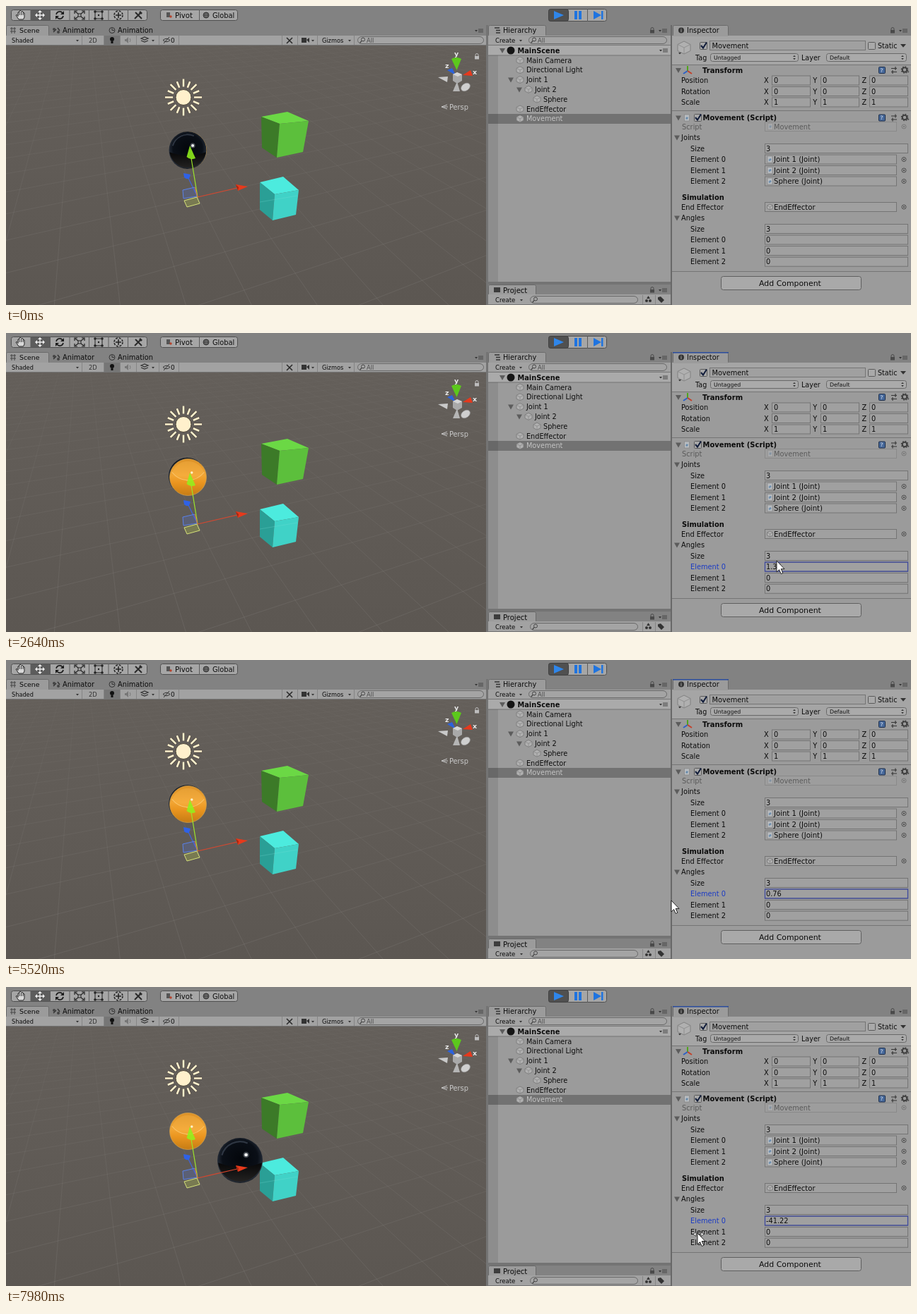
These frames come from a looping animation (1280x424 px, 8 s). An HTML page:

```html
<!DOCTYPE html>
<html lang="en">
<head>
<meta charset="utf-8">
<title>Joint angle editor</title>
<style>
html, body { margin: 0; width: 100%; height: 100%; overflow: hidden; background: #828282; }
svg { display: block; width: 100vw; height: 100vh; }
text { font-family: "DejaVu Sans", Verdana, sans-serif; white-space: pre; }
</style>
</head>
<body>
<svg id="stage" viewBox="0 0 1280 424" xmlns="http://www.w3.org/2000/svg"></svg>
<script>
const INK = '#0c0c0c', PANEL = '#9b9b9b', STRIP = '#828282', EDGE = '#686868';
const stage = document.getElementById('stage');

// Drawing helpers, all return markup
const box = (x, y, w, h, fill, more = '') => `<rect x="${x}" y="${y}" width="${w}" height="${h}" fill="${fill}" ${more}/>`;
const poly = (pts, fill, more = '') => `<polygon points="${pts}" fill="${fill}" ${more}/>`;
const path = (d, color, w = 1, more = '') => `<path d="${d}" fill="none" stroke="${color}" stroke-width="${w}" ${more}/>`;
const dot = (x, y, r, fill, more = '') => `<circle cx="${x}" cy="${y}" r="${r}" fill="${fill}" ${more}/>`;
const text = (x, y, s, size = 9.8, fill = INK, more = '') =>
  `<text x="${x}" y="${y + size * .37}" font-size="${size}" fill="${fill}" ${more}>${s}</text>`;
const bold = (x, y, s, size = 9.8) => text(x, y, s, size, INK, 'font-weight="700"');
const at = (x, y, s) => `<g transform="translate(${x} ${y})">${s}</g>`;
const frame = (x, y, w, h, fill, r = 0, stroke = EDGE) =>
  box(x + .5, y + .5, w - 1, h - 1, fill, `rx="${r}" stroke="${stroke}"`);
const down = (x, y, s = 3, c = '#333') => poly(`${x - s},${y - s / 2} ${x + s},${y - s / 2} ${x},${y + s * .7}`, c);
const fold = (x, y) => poly(`${x - 4},${y - 3} ${x + 4},${y - 3} ${x},${y + 4}`, '#5c5c5c');

const cubeIcon = (x, y, r = 5) => at(x, y,
  poly(`0,${-r} ${r},${-r * .5} ${r},${r * .5} 0,${r} ${-r},${r * .5} ${-r},${-r * .5}`, '#b0b0b0', 'stroke="#777" stroke-width=".8"') +
  path(`M${-r} ${-r * .5}L0 0L${r} ${-r * .5}M0 0V${r}`, '#888', .8));
const fileIcon = (x, y) => box(x - 3.5, y - 4.5, 7, 9, '#b8bcc0', 'stroke="#858585" stroke-width=".7"') +
  text(x - 2.2, y, '#', 5.5, '#3b6fa0');
const lock = (x, y, c = '#4a4a4a') => box(x - 3, y - 1, 6, 4.5, c) + path(`M${x - 2} ${y - 1}v-1.5a2 2 0 0 1 4 0v1.5`, c);
const menu = (x, y) => down(x - 4, y, 2) + path(`M${x - 1} ${y - 2}h7m-7 2h7m-7 2h7`, '#444', .9);
const lens = (x, y) => dot(x, y - 1, 2.5, 'none', 'stroke="#444"') + path(`M${x - 2} ${y + 1}l-2.5 3`, '#444', 1.2);
const pick = y => dot(1270, y, 3, 'none', 'stroke="#444" stroke-width=".9"') + dot(1270, y, 1, '#333');
const gear = (x, y) => dot(x, y, 3.2, 'none', 'stroke="#3c3c3c" stroke-width="1.8"') +
  dot(x, y, 4.6, 'none', 'stroke="#3c3c3c" stroke-width="1.4" stroke-dasharray="1.8 1.8"') + down(x + 5, y + 3, 1.6);
const field = (x, y, w) => frame(x, y - 7, w, 14, '#a0a0a0', 0, '#747474');
const check = (x, y, on) => frame(x - 5, y - 5, 11, 11, '#a9a9a9', 1, '#5a5a5a') +
  (on ? path(`M${x - 3} ${y}l3 3.5l5 -8`, '#101c3a', 2) : '');
const drop = (x, y, w, s) => frame(x, y - 6, w, 12, '#aaa', 3) + text(x + 5, y, s, 7.8) +
  down(x + w - 6, y + 2, 1.8) + poly(`${x + w - 8},${y - 1} ${x + w - 4},${y - 1} ${x + w - 6},${y - 3}`, '#333');
const search = (x, y, w, label) => frame(x, y - 5.5, w, 11, '#a4a4a4', 5.5) + lens(x + 8, y) + text(x + 13, y, label, 8.4, '#4c4c4c');
const line = (x, y, w) => box(x, y, w, 1, '#757575');

const defs = `<defs>
<clipPath id="view"><rect y="56" width="679" height="368"/></clipPath>
<linearGradient id="ground" x2="0" y2="1"><stop stop-color="#645f5a"/><stop offset="1" stop-color="#5c5752"/></linearGradient>
<linearGradient id="fade" gradientUnits="userSpaceOnUse" x1="0" y1="56" x2="0" y2="424">
<stop stop-color="#ddd" stop-opacity=".02"/><stop offset="1" stop-color="#ddd" stop-opacity=".09"/></linearGradient>
<radialGradient id="dark" cx=".5" cy=".45" r=".56"><stop stop-color="#04070c"/><stop offset=".7" stop-color="#0a0f17"/>
<stop offset=".92" stop-color="#262e3a"/><stop offset="1" stop-color="#12151a"/></radialGradient>
<linearGradient id="floor" x2="0" y2="1"><stop stop-color="#070708"/><stop offset="1" stop-color="#232221"/></linearGradient>
<linearGradient id="gold" x2="0" y2="1"><stop stop-color="#dc9228"/><stop offset=".45" stop-color="#f2a533"/>
<stop offset=".65" stop-color="#ea951f"/><stop offset="1" stop-color="#c67c14"/></linearGradient></defs>`;

// Perspective floor, in homogeneous coordinates
function floorGrid() {
  const a = .039, b = .095;
  const pt = (i, j) => {
    const w = 1 + a * i + b * j;
    return [(271 + 1736 * a * i + 106 * b * j) / w, (271 - 60 * (a * i + b * j)) / w].map(n => n.toFixed(1)).join(' ');
  };
  let d = '';
  for (let i = -32; i <= 60; i++) d += `M${pt(i, (-.88 - a * i) / b)}L${pt(i, 40)}`;
  for (let j = -14; j <= 28; j++) d += `M${pt((-.88 - b * j) / a, j)}L${pt(90, j)}`;
  return path(d, 'url(#fade)', 1);
}

function sun() {
  let d = '';
  for (let k = 0; k < 16; k++) {
    const q = k * Math.PI / 8, c = Math.cos(q), s = Math.sin(q), r = k % 2 ? 24 : 26;
    d += `M${15 * c} ${15 * s}L${r * c} ${r * s}`;
  }
  return at(251, 129.5, path(d, '#3a352c', 4.4, 'opacity=".4"') + path(d, '#fff0cc', 2.6) +
    dot(0, 0, 11, '#fff0cc', 'stroke="#4b4438" stroke-width="1"'));
}

const ball = (id, inner) => `<g id="${id}">${inner}</g>`;
const darkBall = dot(0, 0, 30, 'url(#dark)') +
  '<path d="M-29 3Q0 14 29 3A29.3 29.3 0 0 1 -29 3Z" fill="url(#floor)"/>' +
  path('M-24 -7A25 25 0 0 1 10 -23', '#46505f', 2, 'opacity=".6"') + dot(8, -7.5, 4, '#b9c2cc', 'opacity=".35"') + dot(8, -7.5, 2.2, '#fff');
const goldBall = dot(0, 0, 29.6, 'url(#gold)', 'stroke="#cfa050" stroke-width=".9"') +
  '<path d="M-26 -8Q-18 -25 0 -26Q18 -25 26 -8Q15 5 0 5Q-15 5 -26 -8Z" fill="#ffc45c" opacity=".22"/>' +
  path('M-26 -8Q-15 5 0 5Q15 5 26 -8', '#ffd488', 1.2, 'opacity=".7"') + dot(6, -7.5, 2, '#fff3c8');

const cubes =
  poly('361,157 398,150 428,163 387,167', '#6bd845') + poly('361,157 387,167 383,215 362,201', '#3c7a28') +
  poly('387,167 428,163 420,207 383,215', '#5cbf3c') +
  poly('359,250 392,242 414,261 380,267', '#4cebde') + poly('359,250 380,267 377,304 359,289', '#2a9f96') +
  poly('380,267 414,261 410,296 377,304', '#40d2c7') + path('M359 278L412 269', '#7adfd6', .7, 'opacity=".4"');

const handles =
  path('M271 271L327 258', '#d8452c', 1.2) + path('M271 271L262 216', '#9be42c', 1.2) + path('M268 265L258 244', '#3c62e0', 1.2) +
  poly('250,261 267,257 270,270 251,273', '#4a70d8', 'fill-opacity=".25" stroke="#5a82ea"') +
  poly('252,276 270,271 274,280 256,285', '#a9b84a', 'fill-opacity=".35" stroke="#d6e27a"') +
  path('M267 257L271 271', '#e06a3c', 1) +
  poly('325,253 342,256 328,262', '#e63a1c') + poly('325,253 329,257 328,262', '#a8260f') +
  `<path d="M260 198L255.500 214Q261 219 268 216Z" fill="#92f01c" opacity=".88"/>` +
  `<path d="M251 237L261 239L259 245Q255 246 252 243Z" fill="#2f62e6"/>`;

const compass =
  poly('611,101 625,100 624,108', '#c9c9c9') + poly('632,121 642,121 638,107', '#b5b5b5') +
  '<ellipse cx="650" cy="115" rx="7" ry="5" transform="rotate(-35 650 115)" fill="#cfcfcf" stroke="#999" stroke-width=".6"/>' +
  poly('624,91 631,88 636,98', '#2c62dc') +
  poly('632,97 638,94 645,97 645,106 638,110 632,106', '#a9a9a9') + poly('632,97 638,94 645,97 639,100', '#d4d4d4') +
  poly('646,98 657,91 660,99', '#e5391d') + '<path d="M630 75Q637 71 644 75L637.500 91Z" fill="#5cc81c"/>' +
  [['y', 634, 67], ['z', 621, 84], ['x', 660, 93]].map(([s, x, y]) => text(x, y, s, 9.5, '#e8e8e8', 'font-weight="700"')).join('') +
  lock(666, 72, '#bdbdbd') + path('M624 140L616 143L624 146M616 143H625', '#c6c6c6', 1) + text(627, 143, 'Persp', 9.8, '#c8c8c8');

function topBar() {
  let s = frame(7, 5, 193, 16, '#a6a6a6', 3, '#4f4f4f') + box(35, 5.5, 27, 15, '#5c5c5c');
  for (let k = 1; k < 7; k++) s += box(7 + k * 27.5, 5, 1, 16, '#5c5c5c');
  s += at(21, 13, '<path d="M-3 6L-7 0L-5.500 -.5L-4 1.500V-4L-2 -4.500V-6L0 -6.500L1 -5.500L3 -5V-3.500L5 -3V3L3.500 6Z" fill="#d8d8d8" stroke="#222"/>' +
    path('M-2 -4V0M.5 -5V0M3 -3V0', '#222', .9));
  s += at(48, 13, path('M-5 0H5M0 -5V5', '#eee', 1.3) + poly('-7,0 -4,-3 -4,3', '#eee') + poly('7,0 4,-3 4,3', '#eee') +
    poly('0,-7 -3,-4 3,-4', '#eee') + poly('0,7 -3,4 3,4', '#eee'));
  s += at(76, 13, path('M-5 -1A5 5 0 0 1 4 -3M5 1A5 5 0 0 1 -4 3', '#1c1c1c', 1.6) + poly('6,-6 6,-1 1,-1', '#1c1c1c') + poly('-6,6 -6,1 -1,1', '#1c1c1c'));
  s += at(104, 13, box(-2, -2, 4, 4, 'none', 'stroke="#222"') + path('M-2 -2L-6 -5M2 -2L6 -5M-2 2L-6 5M2 2L6 5M-7 -2V-6H-3M7 -2V-6H3M-7 2V6H-3M7 2V6H3', '#222', 1.2));
  s += at(131, 13, box(-5, -5, 10, 10, 'none', 'stroke="#222"') + dot(0, 0, 1.2, '#222') +
    [[-5, -5], [5, -5], [-5, 5], [5, 5]].map(([x, y]) => dot(x, y, 1.8, '#222')).join(''));
  s += at(159, 13, dot(0, 0, 6, 'none', 'stroke="#222" stroke-width="1.5" stroke-dasharray="3 1.7"') + path('M-4 0H4M0 -4V4', '#222', 1.5));
  s += at(187, 13, path('M-5 5L4 -4M-4 -4L5 5', '#2a2a2a', 2) + path('M2 -5L5 -2', '#2a2a2a', 2.6));
  s += frame(218, 5, 110, 16, '#a6a6a6', 3, '#4f4f4f') + box(273, 5, 1, 16, '#5c5c5c');
  s += box(227, 9, 5, 7, '#555') + dot(233, 15, 1.7, '#b5442e') + text(239, 13, 'Pivot', 10.2) + dot(283, 13, 4, '#777', 'stroke="#333"') +
    path('M279 13H287M283 9Q279 13 283 17Q287 13 283 9', '#333', .7) + text(292, 13, 'Global');
  s += frame(767, 4, 83, 18, '#a6a6a6', 3, '#4f4f4f') + frame(767, 4, 29, 18, '#505050', 3, '#404040') + box(822, 4, 1, 18, '#5c5c5c');
  s += poly('775,7 789,13 775,19', '#2f86ea') + box(804, 7, 4, 12, '#1f74e0') + box(810, 7, 4, 12, '#1f74e0') +
    poly('831,7 842,13 831,19', '#1f74e0') + box(842, 7, 2.5, 12, '#1f74e0');
  return s;
}

const tab = (x, y, w) => frame(x, y, w, 16, PANEL, 2, '#6a6a6a') + box(x + 1, y + 13, w - 2, 3, PANEL);

function scenePanel() {
  let s = tab(0, 27, 61) + path('M6 32H14M6 36H14M8 30V39M12 30V39', '#444', 1) + text(19, 34.5, 'Scene', 9.4);
  s += path('M67 37L71 33M73 31L76 35', '#333', 1.4) + dot(68, 33, 2, '#444') + dot(74, 37, 2, '#444') + text(80, 34.5, 'Animator');
  s += dot(150, 34.5, 4, 'none', 'stroke="#333"') + path('M150 31.500V34.500H153', '#333') + text(158, 34.5, 'Animation') + menu(669, 35);
  s += box(0, 42, 679, 14, '#a2a2a2') + line(0, 55, 679) + text(8, 48.5, 'Shaded', 8.2) + down(101, 49, 2);
  for (const x of [107, 138, 161, 184, 216, 244, 390, 412, 440, 492]) s += box(x, 42, 1, 13, '#858585');
  s += text(117, 48.5, '2D', 8.4, '#333') + box(139, 42, 22, 13, '#767676') + dot(150, 47, 3, '#111') + box(148.5, 50, 3, 3, '#111');
  s += poly('168,47 170,47 173,44 173,53 170,50 168,50', '#777') + path('M175 46Q177 48.500 175 51', '#777');
  s += path('M191 46L196 44L201 46L196 48ZM191 49L196 51L201 49', '#333', 1.2) + down(208, 49, 2);
  s += path('M222 48.500Q227 44 232 48.500Q227 53 222 48.500M223 53L231 44', '#333', 1) + text(233, 48.5, '0', 9);
  s += path('M397 53L405 45M397 45L405 53', '#2a2a2a', 1.6) + box(418, 45, 7, 7, '#333') + poly('425,48 429,45 429,52', '#333') + down(434, 49, 2);
  s += text(447, 48.5, 'Gizmos', 8.2) + down(486, 49, 2) + search(497, 48.5, 179, 'All');
  s += `<g clip-path="url(#view)">${box(0, 56, 679, 368, 'url(#ground)')}${floorGrid()}${sun()}${cubes}` +
    `<g id="balls">${ball('gold1', goldBall)}${ball('dark1', darkBall)}</g>${handles}${compass}</g>`;
  return s;
}

function listPanel() {
  let s = box(679, 27, 3, 397, '#747474') + box(682, 42, 258, 350, PANEL) + tab(682, 27, 82);
  s += path('M691 31H698M693 34.500H699M693 38H699', '#333', 1.3) + text(703, 34.5, 'Hierarchy') + lock(914, 35) + menu(929, 35);
  s += box(682, 42, 258, 14, '#a2a2a2') + line(682, 55, 258) + text(692, 48.5, 'Create', 8.5) + down(728, 49, 2) + search(739, 48.5, 196, 'All');
  s += box(682, 56, 258, 14, '#aaa') + line(682, 69.5, 258);
  s += fold(702, 63) + dot(714, 63, 5.5, '#151515') + bold(723.5, 63, 'MainScene') + menu(930, 63);
  s += box(682, 153, 258, 14, '#727272') + box(682, 70, 14, 321, '#000', 'opacity=".09"');
  const rows = [['Main Camera', 0], ['Directional Light', 0], ['Joint 1', 0, 1], ['Joint 2', 1, 1], ['Sphere', 2], ['EndEffector', 0], ['Movement', 0]];
  rows.forEach(([name, depth, open], k) => {
    const x = 736 + depth * 12, y = 77 + k * 13.8;
    s += (open ? fold(x - 22, y) : '') + cubeIcon(x - 9, y) + text(x, y, name, 9.7, k == 6 ? '#c4c4c4' : INK);
  });
  s += box(682, 391, 258, 4, '#747474') + tab(682, 395, 68) + box(690, 399, 9, 7, '#3c3c3c') + text(703, 403, 'Project', 10) + lock(914, 403) + menu(929, 403);
  s += box(682, 409, 258, 15, '#a2a2a2') + line(682, 423, 258) + text(692, 416.5, 'Create', 8.5) + down(729, 417, 2) + search(741, 416.5, 153, '');
  s += dot(906, 418, 2, '#333') + dot(911, 418, 2, '#333') + poly('906,415 908.5,411 911,415', '#333') + poly('922,413 926,412 931,417 927,421 922,416', '#333');
  return s + box(900, 410, 1, 13, '#858585') + box(918, 410, 1, 13, '#858585') + box(940, 27, 2, 397, '#686868');
}

const header = y => frame(1234, y - 5, 10, 10, '#46689a', 1, '#1e2e4a') + text(1236.5, y, '?', 7.5, '#e4ebf4') +
  path(`M1252 ${y - 2.5}H1260M1252 ${y + 2.5}H1260M1254 ${y}v5M1258 ${y - 5}v5`, '#333', 1.1) + gear(1271, y - .5) + fold(951, y);

function inspector() {
  let s = box(942, 42, 338, 382, PANEL) + box(942, 42, 338, 41, '#a5a5a5') + tab(943, 27, 79) +
    `<rect id="focusTab" x="943" y="27" width="79" height="1.6" fill="#2f4f9c"/>`;
  s += dot(955, 34.5, 4, '#333') + text(954, 34.5, 'i', 7, '#eee') + text(963, 34.5, 'Inspector') + lock(1254, 35) + menu(1269, 35);
  s += cubeIcon(959, 59, 9) + down(953, 67, 2) + check(986, 56, 1) + field(995, 56, 221) + text(998.5, 56, 'Movement') + check(1224, 56) + text(1233, 56, 'Static', 9.6) + down(1269, 56, 4);
  s += text(975, 73, 'Tag', 9.6) + drop(996, 73, 125, 'Untagged') + text(1125, 73, 'Layer', 9.6) + drop(1160, 73, 114, 'Default');
  s += line(942, 83, 338) + header(91);
  s += path('M964 92V85', '#4fa51c', 2) + path('M964 92L958 96', '#2c62c8', 2) + path('M964 92L970 96', '#c4402a', 2) + bold(985, 91.5, 'Transform', 10);
  ['Position', 'Rotation', 'Scale'].forEach((name, k) => {
    const y = 105.5 + k * 15.5;
    s += text(955, y, name);
    ['X', 'Y', 'Z'].forEach((axis, c) => s += text(1072 + c * 69.2, y, axis) + field(1083 + c * 69, y, 55) + text(1086 + c * 69, y, k == 2 ? 1 : 0));
  });
  s += line(942, 148, 338) + header(158.5) + fileIcon(963, 158.5) + check(978, 158, 1) + bold(985.5, 158.5, 'Movement (Script)', 9.95);
  s += `<g opacity=".45">${text(956, 171, 'Script')}${field(1073, 171, 187)}${fileIcon(1081, 171)}${text(1086, 171, 'Movement')}${pick(171)}</g>`;
  s += fold(949, 186.5) + text(955, 186.5, 'Joints') + text(968, 202, 'Size') + field(1073, 202, 203) + text(1075, 202, 3);
  const link = (y, x, label, value, icon) => text(x, y, label) + field(1073, y, 187) + icon(1080.5, y, 4) + text(1086, y, value, 10.1) + pick(y);
  ['Joint 1', 'Joint 2', 'Sphere'].forEach((name, k) => s += link(217.5 + k * 15.5, 968, 'Element ' + k, name + ' (Joint)', fileIcon));
  s += bold(956, 271, 'Simulation', 9.9) + link(285, 955, 'End Effector', 'EndEffector', cubeIcon);
  s += fold(949, 300.5) + text(955, 300.5, 'Angles') + text(968, 316, 'Size') + field(1073, 316, 203) + text(1075, 316, 3);
  for (let k = 0; k < 3; k++) {
    const y = 331.5 + k * 15.6, id = n => k ? '' : `id="${n}"`;
    s += text(968, y, 'Element ' + k, 9.8, INK, id('label')) + field(1073, y, 203) + text(1075, y, 0, 9.8, INK, id('value'));
  }
  s += `<rect id="ring" x="1073.5" y="325" width="202" height="13" fill="none" stroke="#3f4a9e" stroke-width="1.3"/>`;
  return s + line(942, 376, 338) + frame(1011, 383, 199, 20, '#a9a9a9', 3, '#5f5f5f') + text(1109, 393, 'Add Component', 10.9, INK, 'text-anchor="middle"');
}

const pointer = `<g id="pointer"><path d="M0 0V16L3.600 12.600L6.200 18.500L8.800 17.400L6.200 11.600H11Z" fill="#fff" stroke="#111" stroke-width=".9"/>
<path id="slide" d="M-6 1.500l4 -3v6zM9 1.500l-4 -3v6z" fill="#fff" stroke="#222" stroke-width=".8"/></g>`;

stage.innerHTML = defs + box(0, 0, 1280, 424, STRIP) + topBar() + scenePanel() + listPanel() + inspector() + pointer;

// time, unwrapped pointer x, pointer y, angle; x wraps around the desktop width
const DESK = 1460;
const keys = [
  [0, -160, 60, 0], [300, -160, 60, 0], [360, -190, 61, 0], [780, -360, 220, 0], [1140, -410, 296, 0],
  [1380, -415, 319, 0], [1500, -415, 319, 0], [1620, -419, 325, 0], [1860, -419, 325, 0], [1920, -419, 326, 0],
  [2100, -419, 326, 0], [2640, -370, 323, 1.35], [2880, -330, 325, 2.9], [3480, -203, 325, 9.8],
  [3720, 33, 325, 19.9], [3780, 97, 325, 22.59], [4320, 720, 328, 49], [4500, 820, 330, 53.4],
  [4560, 800, 331, 52.5], [4800, 527, 349, 40.92], [5040, 184, 369, 27.8], [5160, 12, 362, 21],
  [5340, -202, 352, 13], [5400, -299, 348, 9.2], [6000, -1400, 312, -33.02], [6060, -1450, 311, -35.2],
  [6480, -1592, 311, -41.22], [7200, -1592, 340, -41.22], [7260, -1682, 347, -41.22],
  [7620, -1880, 351, -41.22], [7980, -1942, 349, -41.22]];
// angle, ball x, y, radius
const orbit = [[-41.22, 331, 246, 32], [-33.02, 311, 239.5, 30.7], [0, 257, 204.5, 26.5], [22.59, 257, 181, 23.3], [40.92, 269, 168, 21], [56, 283, 160, 20]];

const segment = (rows, v) => {
  let k = 0;
  while (k < rows.length - 2 && v >= rows[k + 1][0]) k++;
  return k;
};
function lerpRow(rows, v) {
  const k = segment(rows, v), p = rows[k], q = rows[k + 1], f = (v - p[0]) / (q[0] - p[0]);
  return p.map((n, c) => n + (q[c] - n) * f);
}
// Cubic Hermite with slopes weighted by interval length
function smoothRow(rows, v) {
  const k = segment(rows, v), p = rows[k], q = rows[k + 1], h = q[0] - p[0], f = (v - p[0]) / h;
  const rate = (i, c) => (rows[i + 1][c] - rows[i][c]) / (rows[i + 1][0] - rows[i][0]);
  const slope = (i, c) => {
    if (!i) return rate(0, c);
    if (i == rows.length - 1) return rate(i - 1, c);
    const l = rows[i][0] - rows[i - 1][0], r = rows[i + 1][0] - rows[i][0];
    return (rate(i - 1, c) * r + rate(i, c) * l) / (l + r);
  };
  const g = 1 - f;
  return p.map((n, c) => n * g * g * (1 + 2 * f) + q[c] * f * f * (3 - 2 * f) +
    h * (slope(k, c) * f * g * g - slope(k + 1, c) * f * f * g));
}

const el = id => document.getElementById(id);
const [balls, dark, gold, tip, slide, value, label, ring, focusTab] =
  ['balls', 'dark1', 'gold1', 'pointer', 'slide', 'value', 'label', 'ring', 'focusTab'].map(el);
const place = (node, x, y, s = 1) => node.setAttribute('transform', `translate(${x} ${y}) scale(${s})`);
const show = (node, on) => node.setAttribute('visibility', on ? 'visible' : 'hidden');
place(gold, 257.5, 204.5, 26.3 / 30);
let behind = false;

function render(t) {
  const [, u, y, angle] = lerpRow(keys, t);
  const x = ((u % DESK) + DESK) % DESK;
  const focus = t >= 2100, dragging = focus && t <= 6480;
  const [, bx, by, br] = smoothRow(orbit, angle);
  place(dark, bx, by, br / 30);
  if (behind !== angle > 0) {
    behind = angle > 0;
    balls.append(behind ? gold : dark);
  }
  place(tip, Math.round(x), Math.round(y));
  show(tip, t >= 360 && x < 1280);
  slide.setAttribute('display', !dragging && x < 1070 && y >= 322 ? 'inline' : 'none');
  value.textContent = +angle.toFixed(2);
  label.setAttribute('fill', focus ? '#1b3bc4' : INK);
  show(ring, focus);
  show(focusTab, focus);
}

function tick() {
  render(Math.floor(performance.now() % 8000 / 60) * 60);
  requestAnimationFrame(tick);
}
tick();
</script>
</body>
</html>
```
